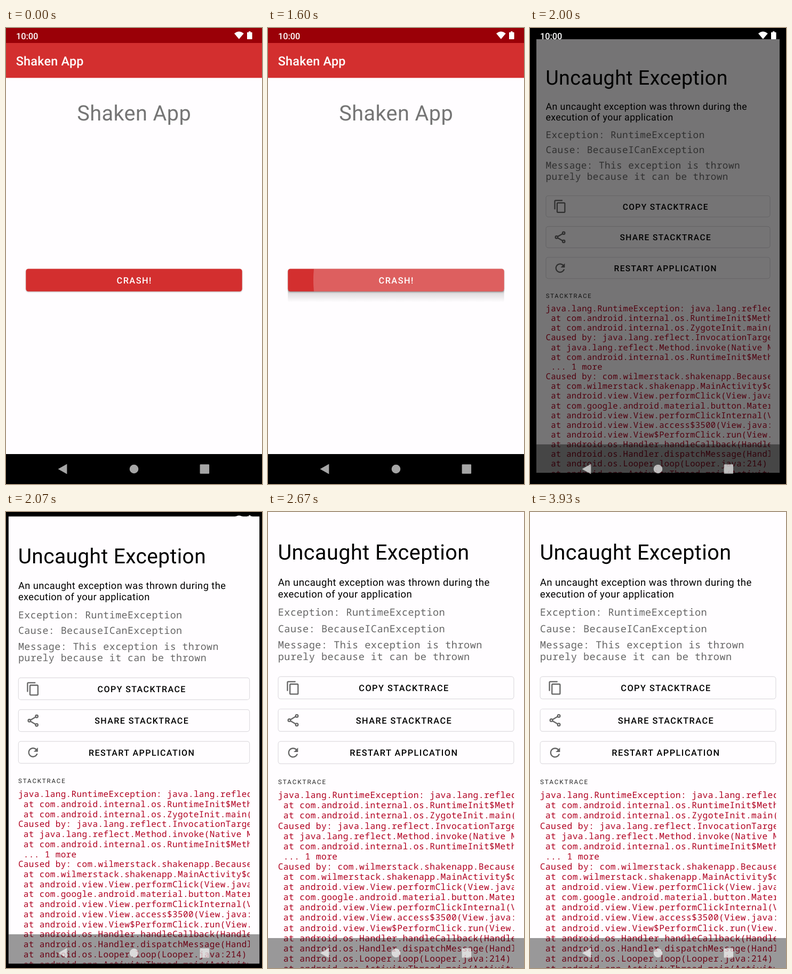
An HTML page for the animation above (3.99 s loop, 480 by 853 pixels).

```html
<!DOCTYPE html>
<html lang="en">
<head>
<meta charset="utf-8">
<title>Crash screen</title>
<style>
  html, body { margin: 0; width: 100%; height: 100%; overflow: hidden; background: #000; }
  svg { display: block; width: 100vw; height: 100vh; }
  text { font-family: Roboto, sans-serif; white-space: pre; text-rendering: geometricPrecision; }
  .headline { font-size: 39.67px; letter-spacing: .42px; }
  .bar { font-size: 23.33px; font-weight: 500; letter-spacing: .29px; fill: #fff; }
  .button { font-size: 16.33px; font-weight: 500; letter-spacing: 1.458px; text-anchor: middle; }
  .body { font-size: 18.67px; letter-spacing: .43px; }
  .detail, .trace { font-family: "Noto Sans Mono", "DejaVu Sans Mono", monospace; letter-spacing: .0225em; }
  .detail { font-size: 18.67px; fill: #666; }
  .trace { font-size: 16.33px; fill: #b00020; }
  .overline { font-size: 11.67px; letter-spacing: 1.944px; fill: #222; }
  .clock { font-size: 16.33px; font-weight: 500; fill: #fff; }
  .raised { filter: drop-shadow(0 1.2px 1.1px rgba(0, 0, 0, .3)); }
  .icon { fill: #666; }
  .line { fill: none; stroke: #666; stroke-width: 2; }
</style>
</head>
<body>
<svg viewBox="0 0 480 853" preserveAspectRatio="none">
  <defs>
    <clipPath id="buttonClip"><rect x="37.3" y="450.4" width="405.4" height="42.4" rx="4.7"/></clipPath>
    <clipPath id="cardClip"><rect width="480" height="853"/></clipPath>
    <clipPath id="traceClip"><rect x="18.67" y="510" width="442.6" height="343"/></clipPath>
    <linearGradient id="shade" x2="0" y2="1">
      <stop stop-color="#000" stop-opacity=".3"/>
      <stop offset=".3" stop-color="#000" stop-opacity=".12"/>
      <stop offset="1" stop-color="#000" stop-opacity="0"/>
    </linearGradient>
  </defs>
  <rect width="480" height="853"/>

  <g id="app">
    <rect width="480" height="797" fill="#fffdff"/>
    <rect width="480" height="28" fill="#9a0007"/>
    <rect y="28" width="480" height="65.3" fill="#d32f2f"/>
    <text class="bar" x="18.67" y="69.7">Shaken App</text>
    <text class="headline" x="240.2" y="173" text-anchor="middle" fill="#757575">Shaken App</text>
    <rect id="lift" x="37.3" y="490" width="405.4" height="23" fill="url(#shade)"/>
    <rect class="raised" x="37.3" y="450.4" width="405.4" height="42.4" rx="4.7" fill="#d32f2f"/>
    <g id="ripple" clip-path="url(#buttonClip)">
      <circle cx="305" cy="471.6" r="220" fill="#fff" fill-opacity=".23"/>
    </g>
    <text class="button" x="240.7" y="478" fill="#fff">CRASH!</text>
  </g>

  <g fill="#fff">
    <text class="clock" x="18.9" y="20.6">10:00</text>
    <path d="M428 10.2Q436.8 3 445.8 10.2L436.9 20.8Z"/>
    <path d="M455 6.2h3.6v1.7h2.2q.8 0 .8.8v11.6q0 .8-.8.8h-8q-.8 0-.8-.8V8.7q0-.8.8-.8h2.2z"/>
  </g>

  <g id="card" clip-path="url(#cardClip)">
    <rect width="480" height="853" fill="#fffdff"/>
    <text class="headline" x="18.4" y="89.4">Uncaught Exception</text>
    <text class="body" x="18.67" y="138.4">An uncaught exception was thrown during the</text>
    <text class="body" x="18.67" y="160.3">execution of your application</text>
    <g id="details"></g>
    <g id="buttons"></g>
    <text class="overline" x="18.9" y="508.9">STACKTRACE</text>
    <g id="trace" clip-path="url(#traceClip)"></g>
    <rect y="797" width="480" height="56" fill-opacity=".4"/>
  </g>

  <g fill="#fff" fill-opacity=".65">
    <path d="M97.6 825L114.4 815.4V834.6Z"/>
    <circle cx="240" cy="825" r="8.3"/>
    <rect x="363.6" y="816.3" width="17.5" height="17.5" rx="1.2"/>
  </g>
</svg>
<script>
  const LOOP = 3990, PRESS = 1600, CRASHED = 1670, OPEN = 2000, SETTLE = 260;
  const $ = id => document.getElementById(id);

  const label = (cls, x, y, text) => `<text class="${cls}" x="${x}" y="${y}">${text}</text>`;

  const details = [
    [194.4, "Exception: RuntimeException"],
    [224.6, "Cause: BecauseICanException"],
    [254.8, "Message: This exception is thrown"],
    [276.6, "purely because it can be thrown"]
  ];

  const buttons = [
    ["COPY STACKTRACE", `<path class="icon" d="M16 1H4c-1.1 0-2 .9-2 2v14h2V3h12V1zm3 4H8c-1.1 0-2 .9-2 2v14c0 1.1.9 2 2 2h11c1.1 0 2-.9 2-2V7c0-1.1-.9-2-2-2zm0 16H8V7h11v14z"/>`],
    ["SHARE STACKTRACE", `<path class="line" d="M16.3 6L7.7 11M7.7 13L16.3 18"/>` +
      [[18, 5], [6, 12], [18, 19]].map(([x, y]) => `<circle class="line" cx="${x}" cy="${y}" r="2"/>`).join("")],
    ["RESTART APPLICATION", `<path class="icon" d="M17.65 6.35C16.2 4.9 14.21 4 12 4c-4.42 0-7.99 3.58-7.99 8s3.57 8 7.99 8c3.73 0 6.84-2.55 7.73-6h-2.08c-.82 2.33-3.04 4-5.65 4-3.31 0-6-2.69-6-6s2.69-6 6-6c1.66 0 3.14.69 4.22 1.78L13 11h7V4l-2.35 2.35z"/>`]
  ];

  const trace = `java.lang.RuntimeException: java.lang.reflect
 at com.android.internal.os.RuntimeInit$Method
 at com.android.internal.os.ZygoteInit.main(Zy
Caused by: java.lang.reflect.InvocationTarget
 at java.lang.reflect.Method.invoke(Native Met
 at com.android.internal.os.RuntimeInit$Method
 ... 1 more
Caused by: com.wilmerstack.shakenapp.BecauseIC
 at com.wilmerstack.shakenapp.MainActivity$onC
 at android.view.View.performClick(View.java:7
 at com.google.android.material.button.Materia
 at android.view.View.performClickInternal(Vie
 at android.view.View.access$3500(View.java:80
 at android.view.View$PerformClick.run(View.ja
 at android.os.Handler.handleCallback(Handler.
 at android.os.Handler.dispatchMessage(Handler
 at android.os.Looper.loop(Looper.java:214)
 at android.app.ActivityThread.main(ActivityTh`.split("\n");

  $("details").innerHTML = details.map(([y, text]) => label("detail", 18.67, y, text)).join("");

  $("buttons").innerHTML = buttons.map(([text, icon], i) => `
    <g transform="translate(0 ${i * 60.6})">
      <rect x="19.1" y="307.9" width="441.8" height="41.8" rx="4.6" fill="none" stroke="#dedce0" stroke-width="1.2"/>
      <g transform="translate(33 315) scale(1.1667)">${icon}</g>
      ${label("button", 255, 335.1, text)}
    </g>`).join("");

  $("trace").innerHTML = trace.map((text, i) => label("trace", 18.67, 535.2 + i * 19.1, text)).join("");

  const show = (id, on) => $(id).setAttribute("visibility", on ? "inherit" : "hidden");

  // Time advances in 15 steps a second, rounded to 10 ms.
  function snap(t) {
    const k = Math.floor((Math.floor(t / 10) + .49) * 3 / 20);
    return Math.round(k * 20 / 3) * 10;
  }

  function draw(time) {
    const t = snap(time % LOOP);
    show("app", t < CRASHED);
    show("ripple", t >= PRESS);
    show("lift", t >= PRESS);
    show("card", t >= OPEN);
    const p = Math.min(1, Math.max(0, (t - OPEN) / SETTLE));
    const scale = 1 - .049 * (1 - p) ** 3;
    $("card").setAttribute("transform", `translate(240 426.5) scale(${scale}) translate(-240 -426.5)`);
    $("card").setAttribute("opacity", Math.min(1, .46 + Math.max(0, t - OPEN) / 60));
  }

  let start;
  function tick(now) {
    start ??= now;
    draw(now - start);
    requestAnimationFrame(tick);
  }
  draw(0);
  requestAnimationFrame(tick);
</script>
</body>
</html>
```
